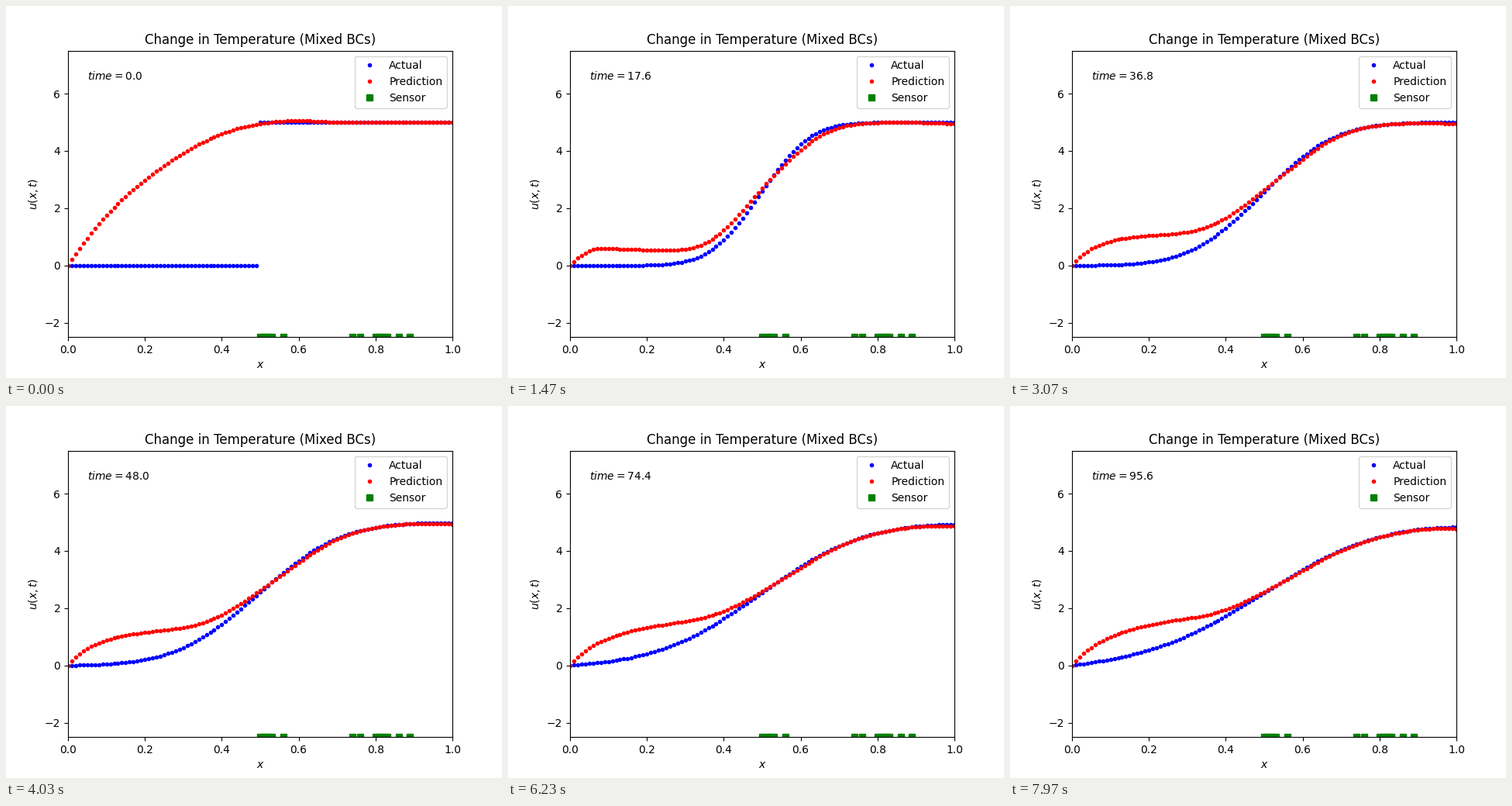
Write a matplotlib script that moves like this. It is 640 by 480 pixels and loops after 8 s.

```python
import math

import matplotlib.pyplot as plt
import numpy as np
from matplotlib.animation import FuncAnimation

FRAMES = 240
DT = 0.4            # simulated time per frame
ALPHA = 0.0003      # diffusivity
HOT = 5.0
EDGE = 0.495        # start of the hot half
SETTLE = 10.4       # time by which the first guess has faded

x = np.linspace(0, 1, 101)
sensors = np.array([.50, .51, .52, .53, .56, .74, .76,
                    .80, .81, .82, .83, .86, .89])

erf = np.vectorize(math.erf)


def actual(x, t):
    """Heat equation, fixed at x=0 and insulated at x=1 (method of images)."""
    width = max(2 * math.sqrt(ALPHA * t), 1e-9)

    def step(a):
        return 0.5 * (1 + erf((x - a) / width))

    return HOT * (step(EDGE) + step(-EDGE) - 1 - step(2 - EDGE))


def ripple(center, width):
    """Odd wave around center, peaking at 1 one width to the right."""
    s = (x - center) / width
    return s * np.exp(0.5 - 0.5 * s ** 2)


def signal(t):
    """Mean reading of the sensors near the front."""
    return actual(sensors[:5], t).mean()


def first_guess():
    rise = 1 - (1 - np.minimum(x / 0.56, 1)) ** 2
    bulge = 0.06 * np.exp(-((x - 0.6) / 0.06) ** 2)
    return HOT * rise + 0.13 * ripple(0, 0.09) + bulge


def model_error(t):
    fade = math.exp((SETTLE - t) / 10)
    hump = (1 - np.exp(-x / 0.07)) * np.exp(-(x / (0.38 - 0.0003 * t)) ** 4)
    return ((1.22 - 0.002 * t) * (1 - fade) * hump
            + 0.41 * fade * ripple(0, 0.06)
            - 3.6 / t * ripple(0.52, 0.085)
            - 0.06 * x ** 16)


def prediction(t):
    late = max(t, SETTLE)
    settled = actual(x, late) + model_error(late)
    low = signal(SETTLE)
    w = max(0, (signal(t) - low) / (HOT - low))
    return settled + w * (first_guess() - settled)


fig, ax = plt.subplots(figsize=(6.4, 4.8), dpi=100)
true_dots, = ax.plot([], [], "b.", label="Actual")
pred_dots, = ax.plot([], [], "r.", label="Prediction")
ax.plot(sensors, np.full(len(sensors), -2.5), "gs", label="Sensor")
clock = ax.text(0.05, 6.5, "")
ax.set(xlim=(0, 1), ylim=(-2.5, 7.5), xlabel="$x$", ylabel="$u(x,t)$",
       title="Change in Temperature (Mixed BCs)")
ax.legend(loc="upper right")


def draw(frame):
    t = frame * DT
    true_dots.set_data(x, actual(x, t))
    pred_dots.set_data(x, prediction(t))
    clock.set_text(f"$time = {t:.1f}$")
    return true_dots, pred_dots, clock


anim = FuncAnimation(fig, draw, frames=FRAMES, interval=8000 / FRAMES,
                     repeat=True, repeat_delay=0)
plt.show()
```
